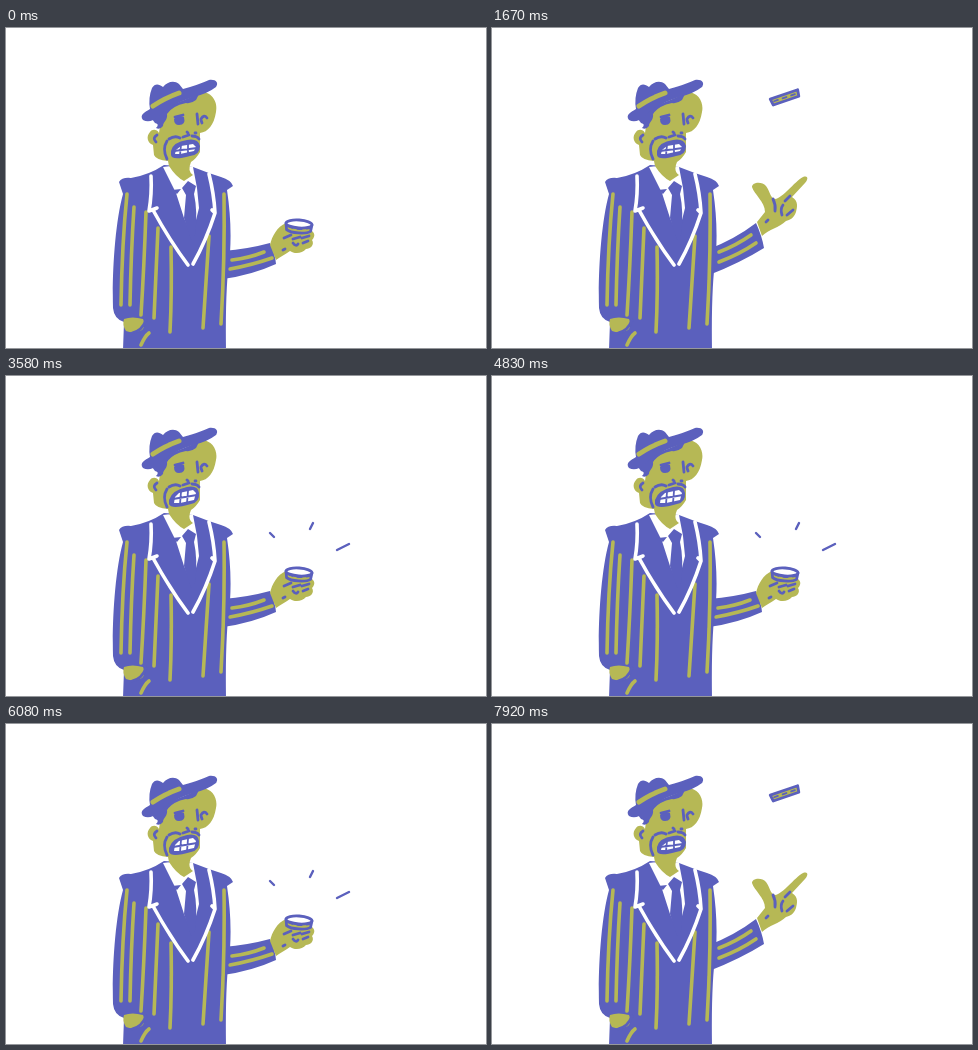
An HTML page for the animation above (8 s loop, 480x320 px).

```html
<!DOCTYPE html>
<html lang="en">
<head>
<meta charset="utf-8">
<title>Coin toss</title>
<style>
  html, body { margin: 0; width: 100%; height: 100%; overflow: hidden; background: #fff; }
  svg { display: block; width: 480px; height: 320px; }
  .blue { fill: #5b60bd; }
  .olive { fill: #b6b855; }
  .white { fill: #fff; }
  .ink, .stripe, .piping { fill: none; stroke-linecap: round; stroke-linejoin: round; }
  .ink { stroke: #5b60bd; stroke-width: 2.8; }
  .stripe { stroke: #b6b855; stroke-width: 3.6; }
  .piping { stroke: #fff; stroke-width: 3.6; }
  .thin { stroke-width: 1.8; }
  .band { stroke-width: 5; }
</style>
</head>
<body>
<svg viewBox="0 0 480 320">
  <g id="holdArm">
    <path class="blue" d="M217 223Q242 221 264 215Q269 225 270 236Q246 247 217 251Z"/>
    <path class="stripe" d="M226 232Q243 230 258 224M224 241Q246 237 266 230"/>
    <path class="olive" d="M264 217C266 208 271 199 280 195L306 203C310 206 308 210 306 212C309 217 304 221 300 221C296 226 288 226 284 223C280 226 274 229 270 232Z"/>
    <path class="ink" d="M278 210L285 207M287 211L294 209M296 210L303 208M287 215Q290 219 292 216M297 215L302 213M277 222L279 221"/>
  </g>
  <g id="flickArm">
    <path class="blue" d="M217 221Q243 211 264 195Q270 208 272 220Q248 235 217 247Z"/>
    <path class="stripe" d="M227 224Q245 217 259 207M227 234Q248 226 264 215"/>
    <path class="olive" d="M265 194L273 184C273 174 262 166 260 159C260 154 270 153 274 158C278 163 278 170 283 171C291 170 302 154 311 149C317 147 316 152 313 155L300 169C307 173 305 180 304 184C302 190 298 192 294 193C287 200 277 201 270 208Z"/>
    <path class="ink" d="M281 171Q284 177 283 183M291 177Q288 181 290 187M298 168L293 173M295 187L301 182M274 194L276 192"/>
  </g>

  <path class="blue" d="M113 154Q116 149 125 150Q143 147 158 137L187 139Q202 145 215 149Q225 152 227 158L221 162Q226 195 224 225Q219 260 220 322H117L118 294Q108 291 107 280C106 245 109 195 117 166Z"/>
  <path class="olive" d="M118 291Q126 288 137 291Q140 298 136 302Q128 306 120 303Q116 297 118 291Z"/>
  <path class="ink" d="M126 305Q136 303 140 292"/>
  <path class="stripe" d="M121 166Q116 215 115 277M128 179Q125 225 124 277M140 184Q138 240 135 287M152 200Q150 245 148 290M165 219Q166 265 164 304M203 208Q200 255 197 300M218 166Q219 230 215 296M143 305Q139 308 135 317"/>

  <path class="white" d="M157 139L165 138L187 139L191 160L193 180L186 208L178 190L170 165Z"/>
  <path class="blue" d="M166 162L175 161L171 166ZM176 160L182 153L190 158L188 166Q192 184 189 207L185 212L178 190L180 167Z"/>
  <path class="piping" d="M145 148Q146 166 143 183L151 180L147 182Q164 213 182 237M187 236Q200 213 209 185L206 182M209 185Q208 166 203 146"/>

  <path class="olive" d="M156 84L195 64C207 64 212 75 210 84C208 97 202 104 194 105L194 124Q190 131 185 134Q181 143 187 147L178 153Q170 149 163 138L162 133Q150 132 148 127L147 117C141 115 140 108 144 104C146 101 151 101 153 105Z"/>
  <path class="blue" d="M146 91L158 80L193 66L190 72Q185 76 180 75Q166 78 161 86C162 92 157 94 157 98Q154 102 150 100Q154 96 149 95Z"/>
  <path class="blue" d="M137 92C133 87 139 84 144 81Q142 70 146 60C149 55 153 56 157 59C161 54 168 52 173 56L177 61Q192 57 203 52C210 51 213 55 210 59Q201 66 187 69Q163 77 153 88Q144 96 137 92Z"/>
  <path class="stripe band" d="M147 78Q159 70 173 65"/>

  <path class="blue" d="M168 91Q172 86 178 89Q180 97 173 97Q168 97 168 91Z"/>
  <path class="ink" d="M169 89L177 87M191 86L192 96M195 91Q198 86 201 90M195 92L196 95M181 104L182 105M189 105L190 105M151 107Q146 110 150 114"/>
  <path class="ink" d="M161 113Q156 121 161 131M163 111Q169 107 174 110M177 109L183 107M186 108Q191 108 193 111"/>
  <g id="grin">
    <path class="blue" d="M165 123Q167 114 181 112Q192 110 194 118Q194 127 184 128Q166 133 165 127Z"/>
    <path class="white" d="M170 122L175 118L187 116L190 119L188 123L174 126L169 126Z"/>
    <path class="ink thin" d="M168 123L191 120M175 117L174 127M182 116L182 126"/>
  </g>
  <g id="teeth">
    <path class="blue" d="M163 124Q166 114 181 111Q192 109 193 117Q194 126 185 128Q165 134 163 128Z"/>
    <path class="white" d="M169 121L173 117L187 114L190 117L188 124L174 127L168 127Z"/>
    <path class="ink thin" d="M167 123L191 119M175 116L174 128M182 115L181 127"/>
  </g>

  <g id="coin">
    <path id="rim" class="olive"/>
    <path id="rimInk" class="ink"/>
    <path id="marks" class="ink thin" stroke-dasharray="4 5"/>
    <ellipse id="face" class="white" stroke="#5b60bd" stroke-width="2.8"/>
  </g>
  <path id="sparks" class="ink" style="stroke-width:2.4"/>
</svg>
<script>
const el = id => document.getElementById(id);
const show = (id, visible) => el(id).style.display = visible ? '' : 'none';
const CYCLE = 15, LOOP = 8000, LAUNCH = 2, CATCH = 11;
const SPARKS = [[264, 157, 268, 161], [304, 153, 307, 147], [331, 174, 343, 168]];
const SPARK_SPAN = { 12: [-.5, .6], 13: [0, 1], 14: [.5, 1] };
const DIP = { 1: 4, 11: 4, 12: 1.5 };

// Twelve drawings a second, with starts rounded to 10 ms.
const drawingAt = ms => Math.ceil((Math.floor(ms / 10) + .5) * .12) - 1;

function drawCoin(step, dip) {
  const flying = step > LAUNCH && step < CATCH;
  const turn = step - 5;
  const y = flying ? 54 + 6.9 * (step - 6.5) ** 2 : 196;
  const rx = flying ? 14.5 : 13;
  const ry = flying ? 11 * Math.abs(Math.sin(turn * 1.1)) : 4;
  const depth = 6.5;
  const top = flying ? -depth / 2 : 0;
  const bottom = top + depth, middle = top + depth / 2;
  const side = `M${-rx} ${top}L${1 - rx} ${bottom}A${rx} ${ry} 0 0 0 ${rx - 1} ${bottom}L${rx} ${top}`;
  el('rim').setAttribute('d', side + 'Z');
  el('rimInk').setAttribute('d', side + 'Z');
  el('marks').setAttribute('d', `M${3 - rx} ${middle}A${rx} ${ry} 0 0 0 ${rx - 2} ${middle}`);
  el('face').setAttribute('rx', rx);
  el('face').setAttribute('ry', ry);
  el('face').setAttribute('cy', top);
  show('face', ry > 1);
  el('coin').setAttribute('transform', flying
    ? `translate(293 ${y}) rotate(${-19 + turn * 14})`
    : `rotate(${dip} 221 235) translate(293 ${y}) rotate(4)`);
}

function drawSparks(step) {
  const span = SPARK_SPAN[step];
  show('sparks', span);
  if (!span) return;
  el('sparks').setAttribute('d', SPARKS.map(([x1, y1, x2, y2]) => {
    const at = k => `${x1 + (x2 - x1) * k} ${y1 + (y2 - y1) * k}`;
    return `M${at(span[0])}L${at(span[1])}`;
  }).join(''));
}

let shown = -1;
function tick() {
  const drawing = drawingAt(performance.now() % LOOP);
  if (drawing !== shown) {
    shown = drawing;
    const step = drawing % CYCLE;
    const flicked = step > LAUNCH && step < CATCH;
    const dip = DIP[step] || 0;
    show('flickArm', flicked);
    show('holdArm', !flicked);
    show('grin', step < CATCH);
    show('teeth', step >= CATCH);
    el('holdArm').setAttribute('transform', `rotate(${dip} 221 235)`);
    drawCoin(step, dip);
    drawSparks(step);
  }
  requestAnimationFrame(tick);
}
tick();
</script>
</body>
</html>
```
